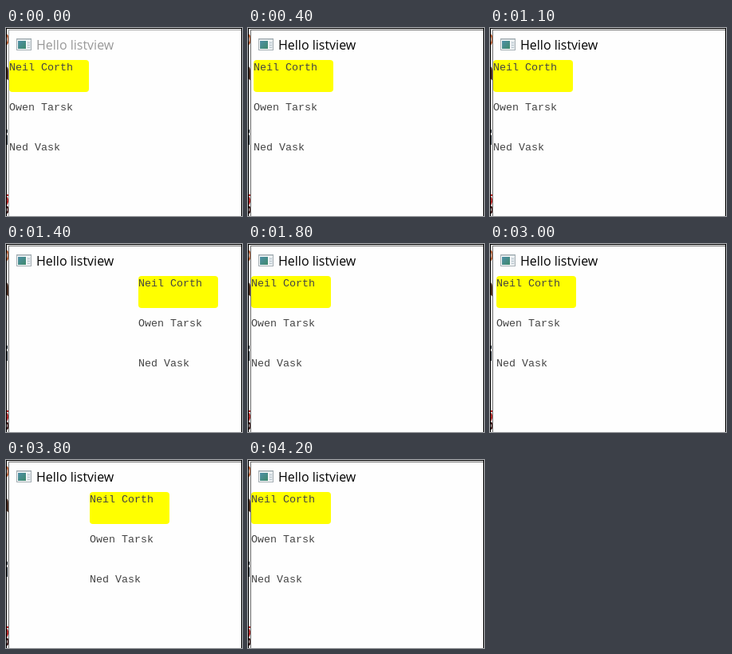
Animation, 296 px wide and 235 px high, one loop 4.9 s. Source, as an HTML page:

```html
<!DOCTYPE html>
<html lang="en">
<head>
<meta charset="utf-8">
<title>Hello listview</title>
<style>
  html, body { margin: 0; width: 100%; height: 100%; overflow: hidden; background: #fff; }
  svg { display: block; width: 296px; height: 235px; }
  .title { font: 16px "Open Sans", "Noto Sans", sans-serif; }
  .item { font: 13.33px "Liberation Mono", "Courier New", monospace; fill: #444; }
  .crisp { shape-rendering: crispEdges; }
</style>
</head>
<body>
<svg viewBox="0 0 296 235">
  <defs>
    <linearGradient id="pane" x2="1" y2="1">
      <stop offset="0" stop-color="#4f8fa8"/>
      <stop offset="1" stop-color="#3f8a6c"/>
    </linearGradient>
  </defs>
  <rect width="296" height="235" fill="#fff"/>
  <rect id="shade" class="crisp" x="1" y="1" width="294" height="234"/>
  <g fill="none" stroke-width="2">
    <path d="M0 8Q3 10 3 14T0 21" stroke="#b4582c"/>
    <path d="M0 49Q2 50 2 54V63L4 65" stroke="#4a2c20"/>
    <path d="M1 127V131M1 134V146" stroke="#1c2834"/>
    <path d="M0 209H4M0 211Q3 213 2 217T0 221" stroke="#b41c1c"/>
    <path d="M0 223Q3 224 3 227T0 232" stroke="#381010"/>
  </g>
  <g class="crisp">
    <path d="M0.5 235V0.5H295.5V235" fill="none" stroke="#000"/>
    <rect x="3" y="2" width="292" height="233" fill="#fefefe"/>
    <path id="edge" d="M3.5 235V2.5H295" fill="none"/>
  </g>
  <g class="crisp">
    <rect x="13.5" y="13.5" width="18" height="14" fill="#fff" stroke="#a3adb2"/>
    <path d="M14 14h17v1h-17z" fill="#c3cdd1"/>
    <path d="M15 16h10v10h-10z" fill="url(#pane)"/>
    <path d="M26 16h5v10h-5z" fill="#e2e8ec"/>
    <path d="M27 18.5h3M27 21.5h3M27 24.5h3" stroke="#b9c6cd"/>
  </g>
  <text id="title" class="title" x="38" y="27">Hello listview</text>
  <g id="list">
    <rect x="4" y="40" width="100" height="40" rx="4" fill="#ff0"/>
    <text class="item" x="4" y="53">Neil Corth</text>
    <text class="item" x="4" y="103">Owen Tarsk</text>
    <text class="item" x="4" y="153">Ned Vask</text>
  </g>
</svg>
<script>
const LOOP = 4900, STEP = 100, REBOUND = 400;

// Each drag lists [time, offset]; the last point is the release.
const drags = [
  [[399, 0], [400, 3], [500, 28], [600, 62], [700, 90], [740, 94]],
  [[1100, 0], [1200, 34], [1300, 112], [1400, 162], [1418, 162]],
  [[2900, 0], [3000, 4], [3100, 20], [3200, 44], [3300, 68], [3400, 86],
   [3500, 95], [3800, 101]]
];

const $ = id => document.getElementById(id);

function along(points, t) {
  const i = points.findIndex(p => p[0] >= t);
  if (i < 1) return points[0][1];
  const [t0, x0] = points[i - 1], [t1, x1] = points[i];
  return x0 + (x1 - x0) * (t - t0) / (t1 - t0);
}

// Accelerate over the first half of the way, then settle exponentially.
function rebound(peak, t) {
  const first = REBOUND / 4;
  if (t < first) return peak * (1 - 0.5 * (t / first) ** 2);
  if (t >= REBOUND) return 0;
  return peak / 2 * 2 ** (-10 * (t - first) / (REBOUND - first));
}

function offset(t) {
  const drag = drags.filter(d => t >= d[0][0]).pop();
  if (!drag) return 0;
  const [release, peak] = drag[drag.length - 1];
  return Math.round(t <= release ? along(drag, t) : rebound(peak, t - release));
}

function draw(time) {
  const t = Math.floor((time % LOOP) / STEP) * STEP;
  const active = t >= 400;
  $("title").setAttribute("fill", active ? "#000" : "#999");
  $("edge").setAttribute("stroke", active ? "#777" : "#aaa");
  $("shade").setAttribute("fill", active ? "#e8e8e8" : "#f0f0f0");
  $("list").setAttribute("transform", `translate(${offset(t)} 0)`);
}

const start = performance.now();
function tick() {
  draw(performance.now() - start);
  requestAnimationFrame(tick);
}
tick();
</script>
</body>
</html>
```
